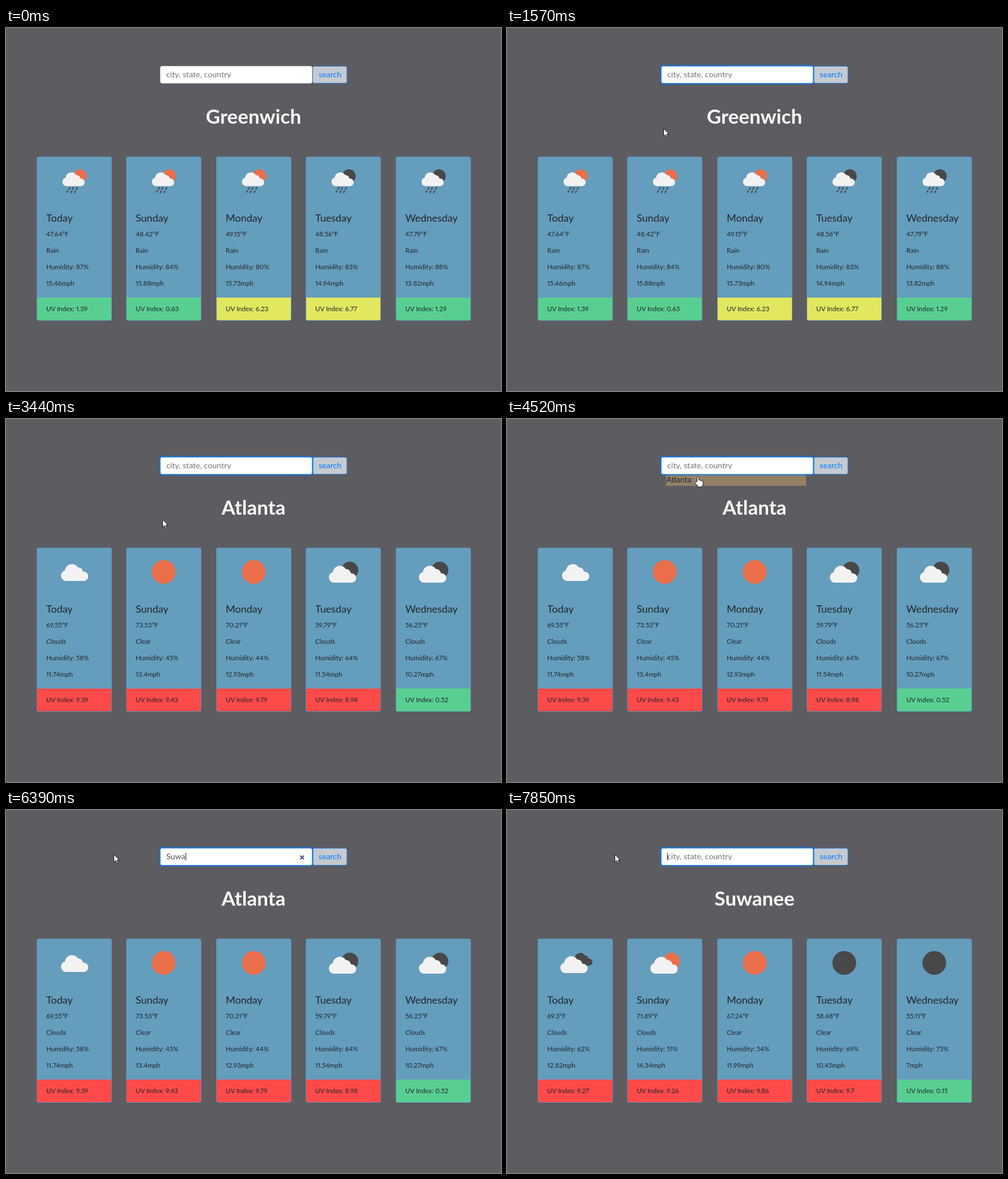
Animation of 874 by 641 pixels, one loop 8000 ms. Source, as an HTML page:

```html
<!DOCTYPE html>
<html lang="en">
<head>
<meta charset="utf-8">
<title>Five day forecast</title>
<style>
html, body { margin: 0; width: 100%; height: 100%; overflow: hidden; background: #5d5c61; }
svg { display: block; }
text { font: 14.2px Lato, "Open Sans", sans-serif; fill: #212529; font-variant-numeric: proportional-nums; white-space: pre; }
.city { font-size: 35px; font-weight: 700; fill: #fff; text-anchor: middle; }
.day { font-size: 18px; }
.row { font-size: 11.6px; }
</style>
</head>
<body>
<svg id="stage" width="874" height="641" viewBox="0 0 874 641">
  <defs>
    <path id="cloud" d="M9.500 33A9.500 9.500 0 0 1 8.500 14.500A12.500 12.500 0 0 1 31.500 9A8.500 8.500 0 0 1 40.500 16.500A8.300 8.300 0 0 1 42.500 33Z"/>
    <g id="rain" fill="none" stroke="#48535c" stroke-width="2.600" stroke-linecap="round">
      <path d="M-8 12l-1 2.500M-2 12l-1 2.500M5 12l-1 2.500M-11.500 17.500l-1 2M-4.500 18l-1.200 2.500M2 18l-1.200 2.500"/>
    </g>
    <path id="arrow" d="M.5.5V14l3-2.800L6 16l2-1L5.800 10.500H10Z" fill="#fff" stroke="#111" stroke-linejoin="round"/>
    <path id="beam" d="M-2.500 -7.500H-.8L0 -7L.8 -7.500H2.500M0 -7V7M-2.500 7.500H-.8L0 7L.8 7.500H2.500" fill="none" stroke="#222"/>
    <path id="hand" d="M-1.500 9V1.500a1.600 1.600 0 0 1 3.200 0V6q2-.8 2.700.8q2-.6 2.600.9q2-.3 2.200 1.500V13q-.4 2.500-1.600 3.300V18H0V16.500L-5.200 10.500q-.4-2 1.300-1.800Z" fill="#fff" stroke="#111" stroke-linejoin="round"/>
  </defs>
</svg>
<script>
const LOOP = 8000, SVG = "http://www.w3.org/2000/svg";
const stage = document.getElementById("stage");

function add(tag, attrs = {}, parent = stage) {
  const el = document.createElementNS(SVG, tag);
  for (const key in attrs) el.setAttribute(key, attrs[key]);
  return parent.appendChild(el);
}
function label(x, y, str = "", attrs = {}, parent = stage) {
  const el = add("text", { x, y, ...attrs }, parent);
  el.textContent = str;
  return el;
}
const show = (el, on) => { el.style.display = on ? "" : "none"; };
const put = (el, str) => { if (el.textContent !== str) el.textContent = str; };

// Each day: icon, temperature, sky, humidity, wind, UV index
const days = ["Today", "Sunday", "Monday", "Tuesday", "Wednesday"];
const reports = [
  { city: "Greenwich", days: [
    "rainDay 47.64 Rain 87 15.46 1.39", "rainDay 48.42 Rain 84 15.88 0.63",
    "rainDay 49.15 Rain 80 15.73 6.23", "rainNight 48.56 Rain 83 14.94 6.77",
    "rainNight 47.79 Rain 88 13.82 1.29"] },
  { city: "Atlanta", days: [
    "cloud 69.55 Clouds 58 11.74 9.39", "sun 73.53 Clear 45 13.4 9.43",
    "sun 70.21 Clear 44 12.93 9.79", "fewNight 59.79 Clouds 64 11.54 8.98",
    "fewNight 56.25 Clouds 67 10.27 0.52"] },
  { city: "Suwanee", days: [
    "broken 69.3 Clouds 62 12.82 9.27", "fewDay 71.89 Clouds 51 14.34 9.26",
    "sun 67.24 Clear 54 11.99 9.86", "moon 58.48 Clear 69 10.45 9.7",
    "moon 55.11 Clear 75 7 0.15"] }
];

// Icons, drawn around their centre
const ORANGE = "#eb6e4b", DARK = "#484849", WHITE = "#f2f2f3";
const disc = (x, y, r, fill) => `<circle cx="${x}" cy="${y}" r="${r}" fill="${fill}"/>`;
const cloud = (x, y, s = 1, fill = WHITE) =>
  `<use href="#cloud" transform="translate(${x} ${y}) scale(${s})" fill="${fill}"/>`;
const rain = fill => disc(10, -8.5, 12, fill) + cloud(-22, -17.5, .81) + '<use href="#rain"/>';
const few = fill => disc(11.5, -3, 15, fill) + cloud(-27, -14);
const icons = {
  rainDay: rain(ORANGE), rainNight: rain(DARK),
  fewDay: few(ORANGE), fewNight: few(DARK),
  sun: disc(0, 0, 21, ORANGE), moon: disc(0, 0, 21, DARK),
  cloud: cloud(-25, -17),
  broken: cloud(-7, -20, .75, DARK) + cloud(-28, -15)
};
const uvColor = uv => uv < 3 ? "#58cf91" : uv < 8 ? "#e1e75e" : "#ff4a4a";

// Search bar
const list = add("g");
add("rect", { x: 280.5, y: 96, width: 247.5, height: 22, fill: "#938067" }, list);
label(281, 111.5, "Atlanta", {}, list);
add("rect", { x: 541.5, y: 67.5, width: 60.500, height: 30, rx: 3, fill: "#c5cad0", stroke: "#1a7ae0" });
label(552, 86.500, "search", { style: "fill:#007bff" });
const ring = add("rect", { x: 271, y: 66, width: 271, height: 33, rx: 4, fill: "none", stroke: "#007bff", "stroke-width": 2, "stroke-opacity": .5 });
const box = add("rect", { x: 272.5, y: 67.5, width: 268, height: 30, rx: 3, fill: "#fff" });
const query = label(283, 86.500);
const caret = add("rect", { y: 76, width: 1, height: 13, fill: "#111" });
const clear = add("path", { d: "M519.500 80.500l6.500 6.500m0-6.500l-6.500 6.500", stroke: "#465a8c", "stroke-width": 2.4 });
const city = label(437, 169, "", { class: "city" });

// Cards
const cards = days.map((day, i) => {
  const g = add("g", { transform: `translate(${Math.round(54 + 158.45 * i)} 227)` });
  add("rect", { x: .5, y: .5, width: 132, height: 289, rx: 3, fill: "#659dbd", stroke: "#588eac" }, g);
  const foot = add("path", { d: "M1 249H132V287q0 2-2 2H3q-2 0-2-2Z" }, g);
  const icon = add("g", { transform: "translate(66.500 43)" }, g);
  label(17, 114.500, day, { class: "day" }, g);
  const rows = [141, 170, 199, 228, 273].map(y => label(17, y, "", { class: "row" }, g));
  return { foot, icon, rows };
});

const pointer = add("g");
const shapes = {};
for (const id of ["arrow", "beam", "hand"]) shapes[id] = add("use", { href: "#" + id }, pointer);

// Timelines: [start, value]
const text = [[0, ""], [2180, "A"], [2380, "At"], [2470, "Atl"], [2560, "Atla"], [2650, "Atlan"],
  [2750, "Atlant"], [2840, "Atlanta"], [3040, ""], [6060, "S"], [6190, "Su"], [6320, "Suw"],
  [6390, "Suwa"], [6520, "Suwane"], [6590, "Suwanee"], [6790, ""]];
const weather = [[0, 0], [3240, 1], [6990, 2]];
const uvIndex = [[0, 0], [3440, 1], [7190, 2]];
const blink = [[0, 0], [1090, 1], [1570, 0], [2120, 1], [3400, 0], [3970, 1], [4500, 0],
  [5030, 1], [5560, 0], [6060, 1], [7320, 0], [7850, 1]];
const path = [[250, 807, 618], [640, 520, 300], [1020, 320, 85], [1090, 320, 88], [1220, 313, 112],
  [1430, 277, 176], [1570, 276, 177], [3770, 276, 177], [4050, 318, 88], [4180, 326, 88],
  [4320, 334, 96], [4520, 337.5, 101.5], [4700, 300, 113], [4840, 219, 106], [5060, 298, 93],
  [5190, 303, 92], [5400, 250, 84], [5660, 190, 78], [LOOP, 190, 78]];

const at = (steps, t) => steps.findLast(s => s[0] <= t)[1];

function position(t) {
  const i = path.findIndex(p => p[0] > t);
  const [t0, x0, y0] = path[i - 1], [t1, x1, y1] = path[i];
  const k = (t - t0) / (t1 - t0);
  return [x0 + (x1 - x0) * k, y0 + (y1 - y0) * k];
}

function drawPointer(t, open) {
  show(pointer, t >= 250);
  if (t < 250) return;
  const [x, y] = position(t);
  const inBox = x > 272 && x < 541 && y > 67 && y < 98;
  const inList = open && x > 280 && x < 528 && y >= 98 && y < 118;
  const kind = inBox ? "beam" : inList ? "hand" : "arrow";
  for (const id in shapes) show(shapes[id], id === kind);
  pointer.setAttribute("transform", `translate(${Math.round(x)} ${Math.round(y)})`);
}

let shown = "";
function drawWeather(w, u) {
  if (shown === w + "," + u) return;
  shown = w + "," + u;
  city.textContent = reports[w].city;
  cards.forEach((card, i) => {
    const [icon, temp, sky, humidity, wind] = reports[w].days[i].split(" ");
    const uv = reports[u].days[i].split(" ")[5];
    card.icon.innerHTML = icons[icon];
    card.foot.setAttribute("fill", uvColor(uv));
    [temp + "°F", sky, `Humidity: ${humidity}%`, wind + "mph", "UV Index: " + uv]
      .forEach((str, n) => put(card.rows[n], str));
  });
}

function draw(t) {
  const typed = at(text, t), focus = t >= 1090, open = t >= 4110 && t < 5590;
  put(query, typed || "city, state, country");
  query.style.fill = typed ? "#495057" : "#6c757d";
  caret.setAttribute("x", 283 + (typed ? Math.round(query.getComputedTextLength()) : 0));
  show(caret, at(blink, t));
  show(clear, typed);
  show(ring, focus);
  show(list, open);
  box.setAttribute("stroke", focus ? "#3a97ff" : "#ced4da");
  drawWeather(at(weather, t), at(uvIndex, t));
  drawPointer(t, open);
}

const start = performance.now();
function tick() {
  draw((performance.now() - start) % LOOP);
  requestAnimationFrame(tick);
}
tick();
</script>
</body>
</html>
```
